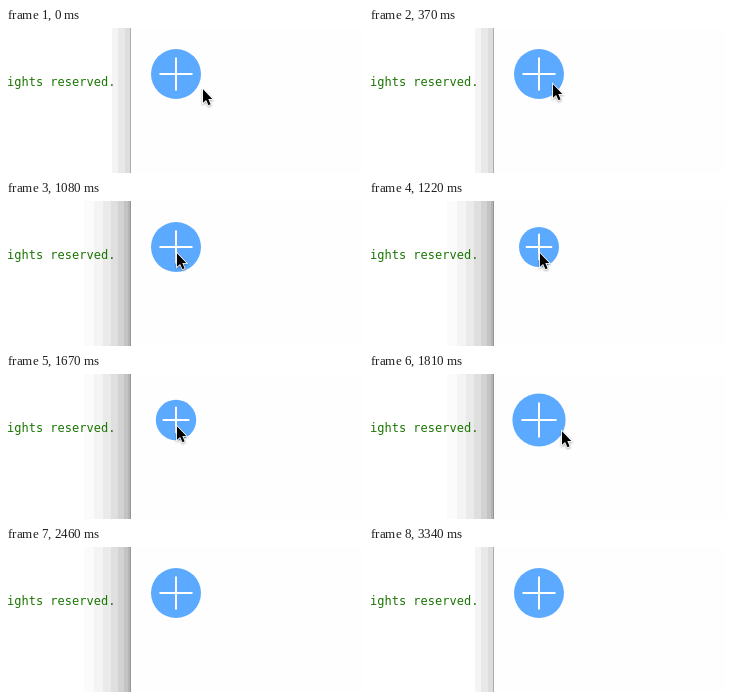
Recreate the animation shown at these times as an HTML page. Size 357x145 px, loop 3.44 s.

```html
<!DOCTYPE html>
<html lang="en">
<head>
<meta charset="utf-8">
<title>Bouncing add button</title>
<style>
  html, body { margin: 0; width: 100%; height: 100%; overflow: hidden; background: #fff; }
  svg { display: block; }
  text { font: 12px "DejaVu Sans Mono", monospace; fill: #197500; white-space: pre; }
  #plus { stroke: #fff; stroke-width: 2; vector-effect: non-scaling-stroke; }
  #cursor { filter: drop-shadow(0 1px 1px rgba(0, 0, 0, .35)); }
</style>
</head>
<body>
<svg width="357" height="145" viewBox="0 0 357 145">
  <rect width="357" height="145" fill="#fff"/>
  <g id="idle"></g>
  <g id="active"></g>
  <rect x="125" width="232" height="145" fill="#fefefe"/>
  <text x="1" y="58">ights reserved.</text>
  <g id="button">
    <circle r="25" fill="#5caaff"/>
    <path id="plus" d="M-16.5 0H16.5M0-16.5V16.5"/>
  </g>
  <path id="cursor" d="M1 1.3V14.8L4.1 11.9L6.5 17.2L8.6 16.3L6.3 11H10.3Z"
        stroke="#fff" stroke-width="1.6" paint-order="stroke"/>
</svg>
<script>
const LOOP = 3440, PRESS = 1080, RELEASE = 1670, BLUR = 3340;
const EDGE = 125, DIP = .2;
const [idle, active, button, cursor] =
  ['idle', 'active', 'button', 'cursor'].map(id => document.getElementById(id));

// Stepped window shadow that darkens towards the edge, ending in a thin line
function drawShadow(group, reach, bands, depth, curve, line) {
  const strip = (x, shade) => {
    const grey = Math.round(255 - shade);
    return `<rect x="${Math.round(x)}" width="${EDGE - Math.round(x)}" height="145" fill="rgb(${grey},${grey},${grey})"/>`;
  };
  let strips = '';
  for (let i = 0; i < bands; i++) {
    strips += strip(EDGE - reach * (1 - i / bands) ** curve, depth * ((i + 1) / bands) ** curve);
  }
  group.innerHTML = strips + strip(EDGE - 1, line);
}
drawShadow(idle, 19, 3, 34, 1, 83);
drawShadow(active, 47, 7, 75, 1.5, 105);

const linear = p => p;
const smooth = p => p * p * (3 - 2 * p);
const accelerate = p => p ** 1.5;
const progress = (t, start, end) => Math.min(1, Math.max(0, (t - start) / (end - start)));

const moves = [
  { start: 0, end: 370, dx: -13, dy: -5, ease: linear },
  { start: 370, end: 560, dx: -13, dy: -2, ease: linear },
  { start: 740, end: 850, dx: 0, dy: -2, ease: linear },
  { start: 1680, end: 2010, dx: 62, dy: 14, ease: smooth },
  { start: 2300, end: 2470, dx: 97, dy: 112, ease: accelerate }
];

function pointerAt(t) {
  let x = 196, y = 60;
  for (const { start, end, dx, dy, ease } of moves) {
    const p = ease(progress(t, start, end));
    x += dx * p;
    y += dy * p;
  }
  return [Math.round(x), Math.round(y)];
}

// Eased press, then a damped spring on release
function scaleAt(t) {
  if (t < RELEASE) return 1 - DIP * smooth(progress(t, PRESS, PRESS + 140));
  const dt = t - RELEASE, angle = dt * 2 * Math.PI / 340;
  return 1 + Math.exp(-dt / 85) * (.32 * Math.sin(angle) - DIP * Math.cos(angle));
}

function draw(t) {
  const focused = t >= PRESS && t < BLUR;
  idle.style.display = focused ? 'none' : '';
  active.style.display = focused ? '' : 'none';
  button.setAttribute('transform', `translate(170 46) scale(${scaleAt(t)})`);
  cursor.setAttribute('transform', `translate(${pointerAt(t)})`);
}

const start = performance.now();
function tick() {
  draw((performance.now() - start) % LOOP);
  requestAnimationFrame(tick);
}
tick();
</script>
</body>
</html>
```
